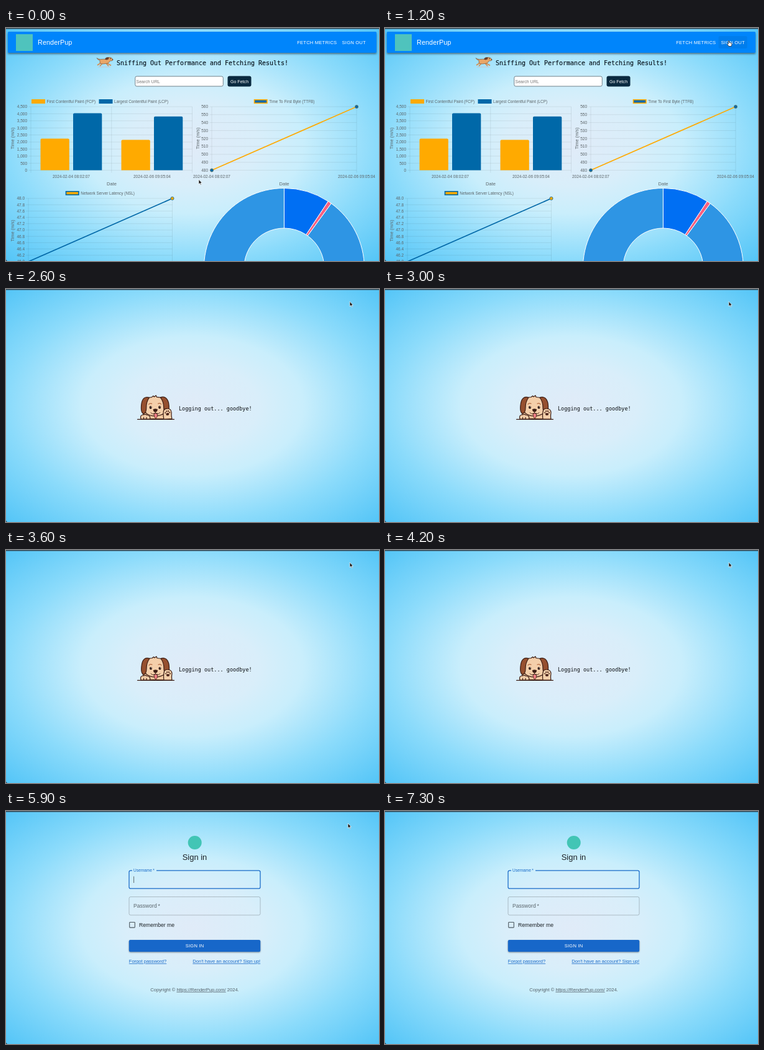
An HTML page for the animation above (7400 ms loop, 600 px wide and 376 px high).

```html
<!DOCTYPE html>
<html lang="en">
<head>
<meta charset="utf-8">
<title>RenderPup</title>
<style>
  html, body { margin: 0; width: 100%; height: 100%; overflow: hidden; background: #5ac8f8; }
  svg { display: block; width: 100vw; height: 100vh; }
  text { font-family: "Liberation Sans", Arial, sans-serif; white-space: pre; }
  .mono { font-family: "DejaVu Sans Mono", monospace; }
  .caps { font-size: 7.56px; letter-spacing: .0286em; fill: #fff; }
  .chart text { fill: #5c6569; }
  .link { font-size: 7.56px; fill: #1769c8; text-decoration: underline; }
  .ink { stroke: #3b1d14; stroke-width: 1.2; stroke-linejoin: round; stroke-linecap: round; }
</style>
</head>
<body>
<svg viewBox="0 0 600 376" preserveAspectRatio="none">
  <defs>
    <radialGradient id="sky" gradientUnits="userSpaceOnUse" cx="0" cy="0" r="1"
      gradientTransform="translate(300 188) scale(424 266)">
      <stop offset="0" stop-color="#e0ebf8"/>
      <stop offset=".25" stop-color="#d9eefa"/>
      <stop offset=".42" stop-color="#c9eefc"/>
      <stop offset=".7" stop-color="#8bdbfb"/>
      <stop offset="1" stop-color="#54c5f7"/>
    </radialGradient>
    <filter id="shade" x="-5%" y="-30%" width="110%" height="190%">
      <feDropShadow dx="0" dy="2" stdDeviation="1.7" flood-color="#123" flood-opacity=".55"/>
    </filter>
  </defs>
  <rect width="600" height="376" fill="url(#sky)"/>

  <g id="dashboard">
    <rect x="3" y="6" width="593" height="34" rx="1.5" fill="#0485fb" filter="url(#shade)"/>
    <rect x="16" y="10" width="27" height="27" fill="#4fc3bd"/>
    <text x="51" y="27" font-size="10.8" letter-spacing=".08" fill="#fff">RenderPup</text>
    <rect id="hover" x="536.5" y="13" width="46" height="20" rx="2" fill="#000" opacity=".06"/>
    <text class="caps" x="468.3" y="25.8">FETCH METRICS</text>
    <text class="caps" x="540.6" y="25.8">SIGN OUT</text>

    <g stroke="#553020" stroke-width=".5" stroke-linejoin="round">
      <path d="M153 56L147 60M155 57L151 61.5M163 57L169 60.5M161 57L165 61.5" stroke="#d98c4a" stroke-width="1.6"/>
      <path d="M151 52Q148 52 146 48.5Q148 50 151.500 50.500Q158 50 162 50.500Q163 47 167 47.300Q171 48 172 51.500Q171 53.500 167.500 53Q165 57.500 160 57.500Q153 59 151 56Z" fill="#e9a667"/>
      <path d="M165 47.500Q160 47 159.500 50.500Q162 52 165 50Z" fill="#70402a"/>
      <circle cx="168" cy="49.500" r=".55" fill="#222"/>
      <circle cx="171.500" cy="51" r=".6" fill="#222"/>
    </g>
    <path d="M148 63H168" stroke="#e7a7a0" stroke-width=".7" opacity=".7"/>
    <text class="mono" x="178" y="60" font-size="9.97" fill="#08131a" stroke="#08131a" stroke-width=".15">Sniffing Out Performance and Fetching Results!</text>

    <rect x="207.800" y="78" width="141.500" height="16" rx="2.500" fill="#fff" stroke="#70818a"/>
    <text x="209.500" y="88.600" font-size="7" fill="#757575">Search URL</text>
    <rect x="356.500" y="77.500" width="38" height="17" rx="3" fill="#0a2a40"/>
    <text x="375.500" y="88.600" font-size="7.1" fill="#fff" text-anchor="middle">Go Fetch</text>
    <g id="charts" class="chart"></g>
  </g>

  <g id="goodbye">
    <g id="head" class="ink">
      <path d="M220 209Q219 198 226 196H255Q262 201 260 210Z" fill="#f2c79f"/>
      <path d="M222 189Q223 175 235 174.500L237.500 172.500L239 174L242 171.800L243 174.500Q257 175 258.500 189Q260 204 240 205Q221 204 222 189Z" fill="#f4cfaa"/>
      <path d="M231 175Q221 172 218.500 184Q216 199 221.500 201Q226 200 226 191Q226 182 231 175Z" fill="#96502f"/>
      <path d="M249 175Q259 172 262 184Q264 198 259 200Q254 199 254 191Q254 182 249 175Z" fill="#96502f"/>
      <path d="M238 201Q238.500 208.500 241 208.500Q244 208 243.500 201Z" fill="#f27f86" stroke-width=".8"/>
      <path d="M240.500 197V200Q237 203.500 233 199.500M240.500 200Q244 203.500 248 199.500" fill="none" stroke-width=".9"/>
      <path d="M237.500 194.500Q240.500 193 243.500 194.500Q243 198 240.500 198Q238 198 237.500 194.500Z" fill="#3b1d14"/>
      <path d="M230 186Q232 183.500 235 185M245 185Q248 183.500 250 186" fill="none" stroke="#b46a42"/>
      <ellipse cx="233" cy="191" rx="2" ry="2.300" fill="#2a1510" stroke="none"/>
      <ellipse cx="247.500" cy="191" rx="2" ry="2.300" fill="#2a1510" stroke="none"/>
      <circle cx="233.600" cy="190.200" r=".65" fill="#fff" stroke="none"/>
      <circle cx="248.100" cy="190.200" r=".65" fill="#fff" stroke="none"/>
    </g>
    <path class="ink" d="M217 210Q215 203 221 203Q224 201.500 227 203.500Q233 204 231.500 210ZM221.500 207V210M226 207V210" fill="#f4cfaa"/>
    <g id="paw" class="ink">
      <path d="M254 210Q253 203 254 199Q254 193 260 193Q267 193 267 200Q266 205 267 210Z" fill="#f4cfaa"/>
      <g fill="#4b241a" stroke="none">
        <ellipse cx="260.500" cy="202" rx="2.600" ry="2.100"/>
        <circle cx="257.200" cy="199.500" r="1.100"/><circle cx="259.200" cy="197.200" r="1.100"/>
        <circle cx="262" cy="197.200" r="1.100"/><circle cx="264" cy="199.500" r="1.100"/>
      </g>
    </g>
    <path class="ink" d="M211.500 210.300H270.500"/>
    <text class="mono" x="278" y="196.300" font-size="8.5" fill="#0b0f12">Logging out... goodbye!</text>
  </g>

  <g id="signin">
    <circle cx="303.700" cy="51" r="11" fill="#42c5b5"/>
    <text x="303.500" y="78.600" font-size="12.96" fill="#1c2226" text-anchor="middle">Sign in</text>
    <path d="M203 96H200.500Q198 96 198 98.500V122.700Q198 125.200 200.500 125.200H406.500Q409 125.200 409 122.700V98.500Q409 96 406.500 96H242" fill="none" stroke="#1769c8" stroke-width="1.250"/>
    <text x="205" y="98.200" font-size="6.48" fill="#1769c8">Username&#8201;*</text>
    <path id="caret" d="M205.600 105.500V116" stroke="#333" stroke-width=".7"/>
    <rect x="198" y="138.500" width="211" height="29.500" rx="2.500" fill="none" stroke="#000" stroke-opacity=".27" stroke-width=".8"/>
    <text x="205" y="156.200" font-size="8.6" fill="#5b666c">Password&#8201;*</text>
    <rect x="198.700" y="179.500" width="8.600" height="8.600" rx=".8" fill="none" stroke="#4c585f" stroke-width="1.100"/>
    <text x="214" y="187" font-size="8.64" fill="#1c2226">Remember me</text>
    <rect x="197.800" y="208" width="211.400" height="19.200" rx="2.200" fill="#1767c9" style="filter:drop-shadow(0 1px 1px #0006)"/>
    <text class="caps" x="303.600" y="220.200" text-anchor="middle">SIGN IN</text>
    <text class="link" x="197.800" y="245.200">Forgot password?</text>
    <text class="link" x="409.200" y="245.200" text-anchor="end">Don't have an account? Sign up!</text>
    <text x="303.500" y="290.800" font-size="7.56" fill="#546068" text-anchor="middle">Copyright © <tspan text-decoration="underline">https://RenderPup.com/</tspan> 2024.</text>
  </g>

  <rect width="600" height="1.600" fill="#364a56"/>
  <path d="M0 373.500V376H3Q.5 376 0 373.500Z" fill="#23333d"/>
  <g id="pointer" stroke="#fff" stroke-width=".7" stroke-linejoin="round">
    <path id="arrow" d="M0 0V7.600L1.800 6L3 8.700L4.200 8.200L3 5.600H5.300Z" fill="#111"/>
    <path id="hand" d="M-.8 .6Q0-.5 .8 .6V3.200Q1.600 2.500 2.300 3.400Q3.100 2.900 3.700 3.800Q4.600 3.500 4.800 4.500V6.600L4 9H0L-2.300 5.700Q-2.300 4.600-.8 5.400Z" fill="#fff" stroke="#111"/>
  </g>
</svg>
<script>
const LOOP = 7400, LOGOUT = 2600, SIGNIN = 5600, BLINK = 567;
const ORANGE = '#ffaa00', BLUE = '#0068a8';
const $ = id => document.getElementById(id);

// Chart markup helpers
const label = (x, y, str, anchor = 'middle', size = 6.46) =>
  `<text x="${x}" y="${y}" font-size="${size}" text-anchor="${anchor}">${str}</text>`;
const line = (x1, y1, x2, y2, color = '#00000020', width = .6) =>
  `<path d="M${x1} ${y1}L${x2} ${y2}" stroke="${color}" stroke-width="${width}"/>`;
const box = (x, y, w, h, fill, extra = '') =>
  `<rect x="${x}" y="${y}" width="${w}" height="${h}" fill="${fill}" ${extra}/>`;
const dot = (x, y, fill, stroke) =>
  `<circle cx="${x}" cy="${y}" r="2.600" fill="${fill}" stroke="${stroke}" stroke-width=".8"/>`;
const legend = (x, y, str, fill, border) =>
  box(x + .8, y + .8, 20.4, 5.4, fill, `stroke="${border}" stroke-width="1.600"`) +
  label(x + 24.6, y + 5.8, str, 'start', 6.4);
const sideTitle = (x, y) => `<g transform="translate(${x} ${y}) rotate(-90)">${label(0, 2.5, 'Time (m/s)', 'middle', 7.4)}</g>`;

function axes({ left, right, top, step, values, columns }) {
  const bottom = top + step * (values.length - 1);
  return values.map((v, i) => {
    const y = top + i * step;
    return line(left - 4, y, right, y) + label(left - 6, y + 2.3, v, 'end');
  }).join('') + columns.map(x => line(x, top, x, bottom + 4)).join('');
}
const ticks = (count, first, step, format) =>
  Array.from({ length: count }, (_, i) => format(first - i * step));

const DATES = ['2024-02-04 08:02:07', '2024-02-06 09:05:04'];

function barChart() {
  const bars = [[55.5, 178.5, ORANGE], [108, 137.5, BLUE], [185.5, 180.5, ORANGE], [238, 142.7, BLUE]];
  return legend(41, 115, 'First Contentful Paint (FCP)', ORANGE, ORANGE) +
    legend(149.5, 115, 'Largest Contentful Paint (LCP)', BLUE, BLUE) +
    axes({ left: 40, right: 299.5, top: 127, step: 11.4, columns: [40, 169.8, 299.5],
      values: ticks(10, 4500, 500, v => v.toLocaleString('en-US')) }) +
    bars.map(([x, y, color]) =>
      `<path d="M${x} 229.600V${y + 2}q0-2 2-2h42.300q2 0 2 2V229.600Z" fill="${color}"/>`).join('') +
    label(105, 241.6, DATES[0]) + label(235, 241.6, DATES[1]) +
    label(170, 253.8, 'Date', 'middle', 7.5) + sideTitle(10.5, 178);
}

function firstByteChart() {
  return legend(398.7, 115, 'Time To First Byte (TTFB)', BLUE, ORANGE) +
    axes({ left: 331, right: 564, top: 127, step: 12.82, columns: [331, 564],
      values: ticks(9, 560, 10, String) }) +
    line(331, 229.5, 564, 127, ORANGE, 1.7) +
    dot(331, 229.5, BLUE, '#6d7d66') + dot(564, 127, BLUE, '#6d7d66') +
    label(331, 241.6, DATES[0]) + label(564, 241.6, DATES[1]) +
    label(447.5, 253.8, 'Date', 'middle', 7.5) + sideTitle(308, 178);
}

function latencyChart() {
  return legend(95.7, 263, 'Network Server Latency (NSL)', ORANGE, BLUE) +
    axes({ left: 36, right: 267.5, top: 275, step: 10.2, columns: [36, 267.5],
      values: ticks(11, 48, .2, v => v.toFixed(1)) }) +
    line(36, 377, 267.5, 275, BLUE, 1.7) + dot(267.5, 275, ORANGE, BLUE) + sideTitle(10.5, 327);
}

function doughnut(cx, cy, outer, inner) {
  const at = (deg, r) => {
    const a = deg * Math.PI / 180;
    return `${cx + r * Math.sin(a)} ${cy - r * Math.cos(a)}`;
  };
  const slice = (from, to, color) => {
    const large = +(to - from > 180);
    return `<path d="M${at(from, outer)}A${outer} ${outer} 0 ${large} 1 ${at(to, outer)}L${at(to, inner)}A${inner} ${inner} 0 ${large} 0 ${at(from, inner)}Z" fill="${color}" stroke="#fff"/>`;
  };
  return slice(0, 33.3, '#006ff3') + slice(33.3, 36, '#fb5f80') + slice(36, 360, '#2e95e4');
}

$('charts').innerHTML = barChart() + firstByteChart() + latencyChart() + doughnut(447.4, 387.5, 129, 64.5);

// Pointer path: time, x, y
const PATH = [[0, 310, 244.5], [250, 310, 244.5], [1000, 553, 20.5], [5600, 553, 20],
  [5900, 550, 20], [6400, 513, 19], [6700, 470, 8]];

function pointerAt(t) {
  const i = PATH.findIndex(p => p[0] > t);
  if (i < 1) return null;
  const [t0, x0, y0] = PATH[i - 1], [t1, x1, y1] = PATH[i];
  const u = (t - t0) / (t1 - t0), k = u * u * (3 - 2 * u);
  return [x0 + (x1 - x0) * k, y0 + (y1 - y0) * k];
}

const show = (id, on) => { $(id).style.display = on ? '' : 'none'; };

function draw(t) {
  show('dashboard', t < LOGOUT);
  show('goodbye', t >= LOGOUT && t < SIGNIN);
  show('signin', t >= SIGNIN);
  show('caret', Math.floor((t - SIGNIN + 1) / BLINK) % 2 === 0);

  const pos = pointerAt(t);
  show('pointer', pos);
  if (pos) {
    const [x, y] = pos;
    const over = t < LOGOUT && x > 536 && y < 33;
    $('pointer').setAttribute('transform', `translate(${x} ${y})`);
    show('hand', over);
    show('arrow', !over);
    show('hover', over);
  }

  const sway = Math.sin((t - 3000) / 600 * Math.PI);
  $('paw').setAttribute('transform', `rotate(${5 * sway} 260 210)`);
  $('head').setAttribute('transform', `rotate(${1.2 * sway} 240 208)`);
}

const start = performance.now();
function tick() {
  draw((performance.now() - start) % LOOP);
  requestAnimationFrame(tick);
}
tick();
</script>
</body>
</html>
```
